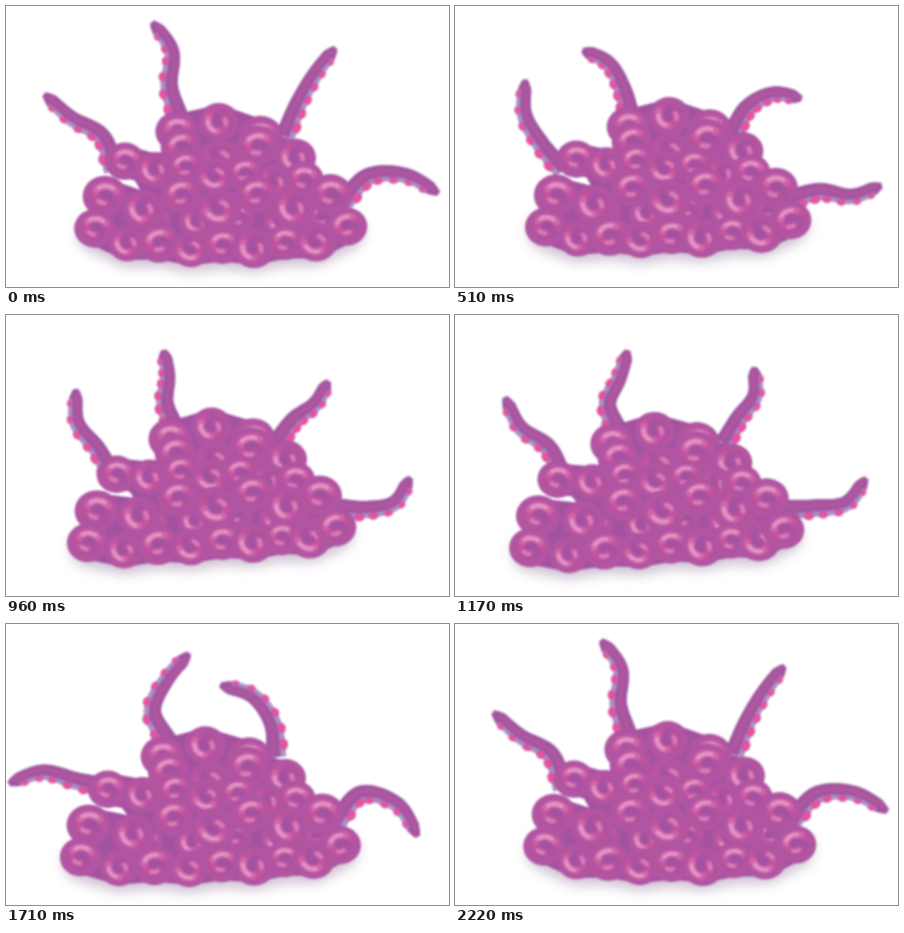
An HTML page with a canvas that plays this animation: 443 px wide and 281 px high, repeating every 2250 ms.

```html
<!DOCTYPE html>
<html lang="en">
<head>
<meta charset="utf-8">
<title>Tentacles</title>
<style>
  html, body { margin: 0; width: 100%; height: 100%; overflow: hidden; background: #fff; }
  canvas { display: block; filter: blur(.9px); }
</style>
</head>
<body>
<canvas id="stage" width="443" height="281"></canvas>
<script>
const ctx = document.getElementById('stage').getContext('2d');
const LOOP = 2250, STEP = 30, SPAN = 2220;
const TIMES = [0, 330, 720, 1170, 1710, 2040];
const PURPLE = '#a352a0';

// Each pose gives the headings, in degrees, of three equal segments.
// side: where the suckers sit; grip: how far the base follows the body.
const tentacles = [
  { x: 107, y: 165, length: 108, shrink: .06, side: -1, grip: 0, poses: [
    [-109, -149, -138], [-125, -130, -107], [-130, -112, -76],
    [-114, -144, -117], [-169, -165, -198], [-125, -153, -170]] },
  { x: 174, y: 113, length: 106, shrink: .26, side: -1, grip: .7, poses: [
    [-107, -86, -123], [-103, -120, -160], [-109, -108, -131],
    [-111, -66, -72], [-117, -66, -49], [-110, -87, -103]] },
  { x: 281, y: 131, length: 104, shrink: .25, side: 1, grip: .7, poses: [
    [-68, -61, -53], [-67, -35, 21], [-52, -27, -25],
    [-60, -55, -92], [-97, -126, -162], [-92, -105, -70]] },
  { x: 338, y: 199, length: 113, shrink: .2, side: 1, grip: .7, poses: [
    [-47, -2, 28], [-30, 21, 3], [0, -10, -45],
    [-3, -9, -52], [-50, 16, 57], [-51, 12, 50]] }
];

// The heap: rows of lumps from the top down.
const rows = [
  { x: [173, 256], y: [125, 131], bow: -12, zig: 0, n: 3, r: 20 },
  { x: [177, 291], y: [147, 146], bow: 0, zig: 6, n: 4, r: 20 },
  { x: [121, 299], y: [157, 177], bow: 0, zig: 3, n: 7, r: 18 },
  { x: [150, 316], y: [214, 214], bow: 0, zig: 2, n: 5, r: 16 },
  { x: [101, 326], y: [196, 196], bow: 0, zig: 7, n: 7, r: 20 },
  { x: [91, 342], y: [223, 223], bow: 19, zig: 2, n: 9, r: 19 }
].map(({ x, y, bow, zig, n, r }) => Array.from({ length: n }, (_, i) => {
  const s = i / (n - 1), odd = i % 2;
  return {
    x: x[0] + (x[1] - x[0]) * s,
    y: y[0] + (y[1] - y[0]) * s + bow * Math.sqrt(Math.abs(Math.sin(Math.PI * s))) + (odd ? zig : -zig),
    r: r + Math.sin(i * 2.4 + n),
    turn: (odd ? -2 : .2) + .35 * Math.sin(i * 5 + n * 3)
  };
}));

// Smooth looping interpolation through the poses.
function poseAt(poses, t) {
  const n = TIMES.length;
  const time = k => TIMES[(k + n) % n] + Math.floor(k / n) * SPAN;
  const at = k => poses[(k + n) % n];
  let i = n - 1;
  while (TIMES[i] > t) i--;
  const h = time(i + 1) - time(i), u = (t - time(i)) / h, v = 1 - u;
  return at(i).map((p, j) => {
    const q = at(i + 1)[j];
    const m0 = (q - at(i - 1)[j]) / (time(i + 1) - time(i - 1)) * h;
    const m1 = (at(i + 2)[j] - p) / (time(i + 2) - time(i)) * h;
    return (1 + 2 * u) * v * v * p + u * v * v * m0 + u * u * (3 - 2 * u) * q - u * u * v * m1;
  });
}

// Rises from 0 to 1 and back once per loop.
const wave = (t, low) => (.5 - .5 * Math.cos((t - low) / SPAN * 2 * Math.PI)) ** 1.5;

// The heap leans left with sway and lifts its lower right with lift.
function makeWarp(sway, lift) {
  return (x, y) => {
    const u = (x - 217) / 140, h = (245 - y) / 130;
    return [
      x + sway * (6 * u - 14 * u * u - 19 * h) - lift * 5 * (u + u * u),
      y + sway * (8 * u * u - 8 * u + 7 * h) + lift * (11 * u * u - 5 * u + 7 * h - 15)
    ];
  };
}

function trace(points) {
  ctx.beginPath();
  points.forEach(p => ctx.lineTo(p[0], p[1]));
}

function fill(points, color) {
  ctx.fillStyle = color;
  trace(points);
  ctx.fill();
}

function stroke(points, color, width, alpha = 1) {
  ctx.globalAlpha = alpha;
  ctx.strokeStyle = color;
  ctx.lineWidth = width;
  trace(points);
  ctx.stroke();
  ctx.globalAlpha = 1;
}

function oval(x, y, rx, ry, angle, color) {
  ctx.fillStyle = color;
  ctx.beginPath();
  ctx.ellipse(x, y, rx, ry, angle, 0, 7);
  ctx.fill();
}

// Curve through the joints of a chain of segments.
function spine(x, y, segment, headings) {
  const pts = [[x, y]];
  for (const deg of headings) {
    const a = deg * Math.PI / 180, [px, py] = pts[pts.length - 1];
    pts.push([px + Math.cos(a) * segment, py + Math.sin(a) * segment]);
  }
  const beyond = (p, q) => [2 * p[0] - q[0], 2 * p[1] - q[1]];
  const all = [beyond(pts[0], pts[1]), ...pts, beyond(pts[3], pts[2])];
  return s => {
    const k = Math.min(2, Math.floor(s * 3)), u = s * 3 - k;
    return [0, 1].map(j => {
      const [a, b, c, d] = all.slice(k, k + 4).map(q => q[j]);
      return b + u / 2 * (c - a + u * (2 * a - 5 * b + 4 * c - d + u * (3 * (b - c) + d - a)));
    });
  };
}

function drawTentacle(arm, t, warp, lift) {
  const { x, y, side, grip } = arm;
  const [wx, wy] = warp(x, y);
  const segment = arm.length * (1 - arm.shrink * lift) / 3;
  const curve = spine(x + (wx - x) * grip, y + (wy - y) * grip, segment, poseAt(arm.poses, t));
  const half = s => (10.5 - 3.6 * s) * Math.sqrt(Math.min(1, (1 - s) * 9 + .12));
  const angleAt = s => {
    const a = curve(Math.max(0, s - .02)), b = curve(Math.min(1, s + .02));
    return Math.atan2(b[1] - a[1], b[0] - a[0]);
  };
  const edge = (s, offset) => {
    const p = curve(s), a = angleAt(s), d = half(s) * offset * side;
    return [p[0] - Math.sin(a) * d, p[1] + Math.cos(a) * d];
  };
  const line = (offset, from = 0, to = 1) =>
    Array.from({ length: 31 }, (_, i) => edge(from + (to - from) * i / 30, offset));
  const ribbon = (a, b, color, from, to) =>
    fill([...line(a, from, to), ...line(b, from, to).reverse()], color);

  ribbon(-1, .85, '#ad8fc4');
  ribbon(-1, .25, '#a555a0');
  ribbon(-1, .85, '#a555a0', .9, 1);
  stroke(line(-.95), '#98589f', 1.6, .7);
  stroke(line(-.35, .04, .94), '#b9579f', 4, .6);
  stroke(line(.25, 0, .92), '#90589f', 1.3, .6);
  for (let i = 0; i < 6; i++) {
    const s = .12 + i * .148, a = angleAt(s), [sx, sy] = edge(s, .7), r = 5.2 - 2.5 * s;
    oval(sx, sy, r * 1.15, r * .9, a, '#c45ba4');
    oval(sx, sy, r * .9, r * .66, a, '#ea529f');
  }
}

function drawLump([x, y], { r, turn }) {
  ctx.save();
  ctx.translate(x, y);
  ctx.scale(1.08, 1);
  const shade = ctx.createRadialGradient(0, 0, r * .3, 0, 0, r);
  shade.addColorStop(0, PURPLE);
  shade.addColorStop(.75, '#b555a1');
  shade.addColorStop(1, '#a955a2');
  oval(0, 0, r, r, 0, shade);

  ctx.rotate(turn);
  const curl = (from, to) => Array.from({ length: 15 }, (_, i) => {
    const s = from + (to - from) * i / 14, a = -.5 - s * 4.8, d = r * (.64 - .3 * s);
    return [Math.cos(a) * d, Math.sin(a) * d * .9];
  });
  stroke(curl(0, 1), '#c6549f', r * .42, .5);
  stroke(curl(.05, .95), '#cb569f', r * .26, .7);
  stroke(curl(.12, .5), '#d976b2', r * .36, .55);
  stroke(curl(.18, .44), '#e8a0cc', r * .2, .8);
  stroke(curl(.8, .95), '#e08fc0', r * .22, .7);
  ctx.restore();
}

function drawHeap(warp) {
  const place = row => row.map(p => warp(p.x, p.y));
  const base = place(rows[rows.length - 1]);
  ctx.filter = 'blur(6px)';
  stroke(base.map(([x, y]) => [x, y + 6]), '#8a6a92', 36, .4);
  ctx.filter = 'none';
  return () => {
    const placed = rows.map(place);
    const hull = [...placed.map(p => p[0]).reverse(), ...placed.map(p => p[p.length - 1])];
    fill(hull, PURPLE);
    placed.forEach((p, i) => stroke(p, PURPLE, rows[i][0].r * 1.7));
    rows.forEach((row, i) => row.forEach((lump, j) => drawLump(placed[i][j], lump)));
  };
}

function draw(t) {
  ctx.fillStyle = '#fff';
  ctx.fillRect(0, 0, 443, 281);
  ctx.lineCap = ctx.lineJoin = 'round';
  const lift = wave(t, 1940), warp = makeWarp(wave(t, 330), lift);
  const drawBody = drawHeap(warp);
  tentacles.forEach(arm => drawTentacle(arm, t, warp, lift));
  drawBody();
}

const start = performance.now();
function tick() {
  const t = (performance.now() - start) % LOOP;
  draw(Math.floor(t / STEP) * STEP % SPAN);
  requestAnimationFrame(tick);
}
tick();
</script>
</body>
</html>
```
